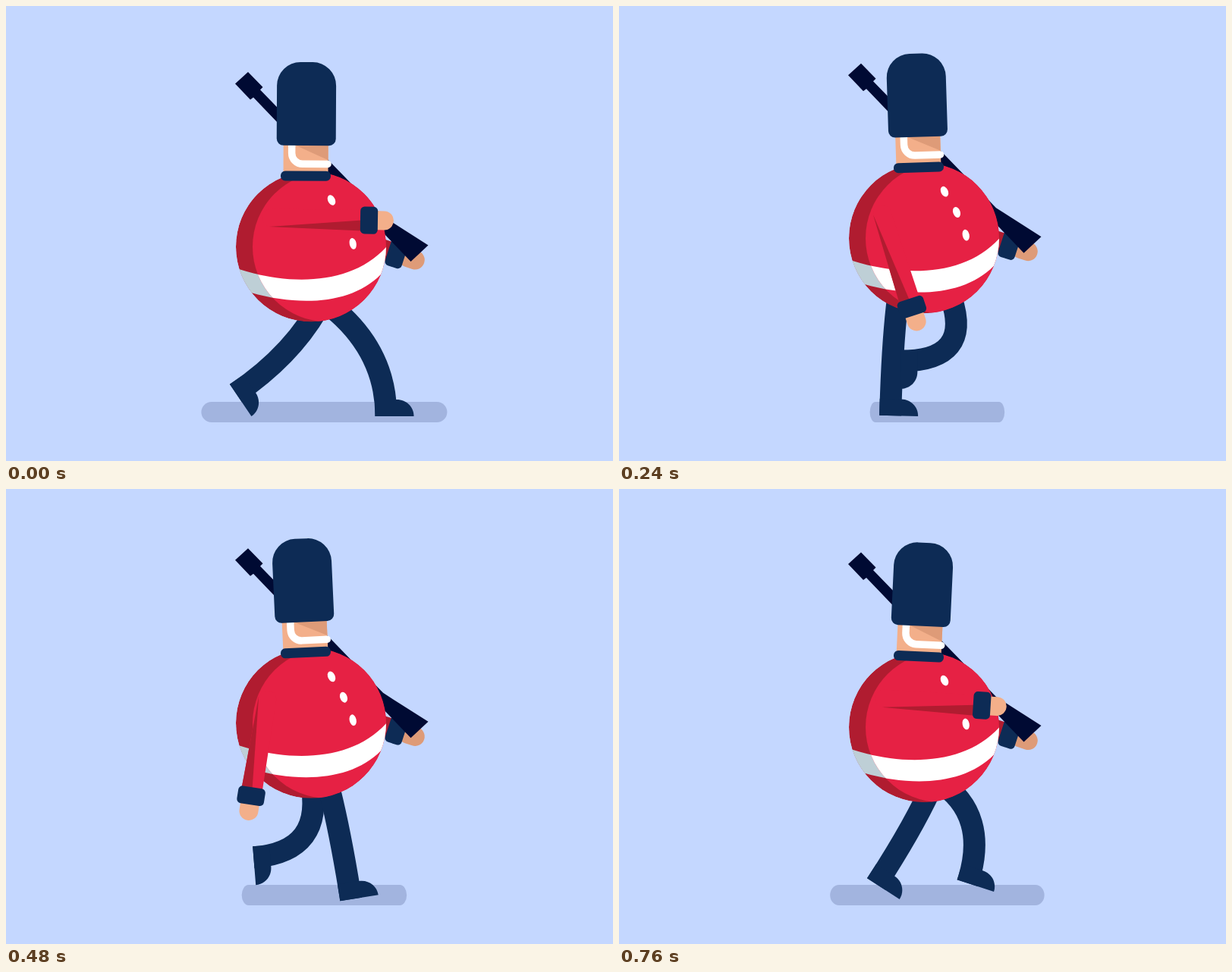
Recreate the animation shown at these times as an HTML page. Size 800 by 600 pixels, loop 800 ms.

```html
<!DOCTYPE html>
<html lang="en">
<head>
<meta charset="utf-8">
<title>Marching guard</title>
<style>
  html, body { margin: 0; width: 100%; height: 100%; overflow: hidden; background: #c4d7ff; }
  svg { display: block; width: 800px; height: 600px; }
  .navy { fill: #0d2b55; }
  .red { fill: #e62144; }
  .wine { fill: #b01c30; }
  .skin { fill: #f3af8a; }
  .tan { fill: #de9b78; }
  .white { fill: #fff; }
  .limb { fill: none; stroke: #0d2b55; stroke-width: 29; }
</style>
</head>
<body>
<svg viewBox="0 0 800 600">
  <defs>
    <clipPath id="belly"><circle cx="402" cy="317.5" r="99"/></clipPath>
    <clipPath id="lit"><circle cx="424" cy="317.5" r="99"/></clipPath>
    <path id="belt" d="M300 345L307 347C375 369 455 368 501 318L506 340L494 354C455 394 385 396 323 378L300 371Z"/>
    <path id="shoe" d="M-14.5 0H36.5C36.5-12 27-22 14-22H-14.5Z"/>
    <rect id="cuff" x="-18" y="123" width="36" height="23" rx="5.5"/>
  </defs>

  <rect id="shadow" x="-161.5" y="522" width="323" height="27" rx="13.5" fill="#a2b4df"/>

  <g class="bob">
    <g transform="translate(386.6 285.4) rotate(-72)">
      <rect class="wine" x="-13.5" y="60" width="27" height="66"/>
      <rect class="tan" x="-12.5" y="138" width="25" height="35" rx="12.5"/>
      <use href="#cuff" class="navy"/>
    </g>
    <path fill="#000a33" d="M302 102.5L319 87L338.5 107L335 110.5L497 277.5L556.5 315.5L533.5 337L326 120.5L322 123.5Z"/>
  </g>

  <g class="leg"><path class="limb"/><use href="#shoe" class="navy"/></g>
  <g class="leg"><path class="limb"/><use href="#shoe" class="navy"/></g>

  <g class="bob">
    <g clip-path="url(#belly)">
      <circle class="wine" cx="402" cy="317.5" r="99"/>
      <use href="#belt" fill="#becfd6"/>
      <g clip-path="url(#lit)">
        <rect class="red" x="300" y="215" width="205" height="205"/>
        <use href="#belt" class="white"/>
      </g>
    </g>
    <g class="white">
      <ellipse rx="4.7" ry="7.2" transform="translate(429 256) rotate(-25)"/>
      <ellipse rx="4.7" ry="7.2" transform="translate(445 283.3) rotate(-20)"/>
      <ellipse rx="4.5" ry="7.5" transform="translate(457.2 313.4) rotate(-12)"/>
    </g>

    <g id="head">
      <rect class="skin" x="365.5" y="180" width="59" height="42"/>
      <path class="tan" d="M380 183H424.5V203Z"/>
      <path d="M376.5 180V194A14.3 14.3 0 0 0 390.8 208.3H424" fill="none" stroke="#fff" stroke-width="9.5" stroke-linecap="round"/>
      <path class="navy" d="M356.5 105A31 31 0 0 1 387.5 74H403.5A31 31 0 0 1 434.5 105V175A9 9 0 0 1 425.5 184H365.5A9 9 0 0 1 356.5 175Z"/>
      <rect class="navy" x="362" y="217.7" width="66" height="13" rx="6"/>
    </g>

    <g id="arm">
      <path class="red" d="M-10.5 3Q-8-6 1-6Q12-6 13 5L13.5 125H-14Z"/>
      <path class="wine" d="M-10.5 3L-14 125H0Z"/>
      <rect class="skin" x="-12.5" y="134" width="25" height="33" rx="12.5"/>
      <use href="#cuff" class="navy"/>
    </g>
  </g>
</svg>

<script>
const LOOP = 800, STRIDE = LOOP / 2, STEP = 40;
const GROUND = 541, TOE = 36.5, SHIN = 95, HIP_Y = 385;
const { PI, sin, cos, max } = Math;
const $ = s => document.querySelector(s);
const $$ = s => [...document.querySelectorAll(s)];

const wave = t => cos(2 * PI * t / LOOP);
const mix = (a, b, u) => a + (b - a) * u;
const lag = u => u - 0.22 * sin(PI * u ** 1.6);
const lift = t => 12.5 * sin(PI * (t % STRIDE / STRIDE) ** 0.88);

// front/back: reach of the foot, toe: push-off angle, roll: how late the heel leaves,
// heel: landing tilt, tuck: extra tilt in the air, rise: foot clearance
const legs = [
  { start: 0, front: 501, back: 296, hip: 398, sway: 31, glide: u => u ** 0.7,
    toe: 88, roll: 8, heel: 0, tuck: 0, rise: 32 },
  { start: STRIDE, front: 481, back: 303, hip: 425, sway: 13, glide: lag,
    toe: 56, roll: 5, heel: 24, tuck: 52, rise: 38 }
];

function pose(leg, time) {
  const t = (time + leg.start) % LOOP, u = t % STRIDE / STRIDE;
  let x, turn, air = 0;
  if (t < STRIDE) {
    x = mix(leg.front, leg.back, leg.glide(u));
    turn = leg.toe * u ** leg.roll - leg.heel * sin(PI * u) * (1 - u) ** 2;
  } else {
    x = mix(leg.back, leg.front, lag(u));
    turn = leg.toe * (1 - u ** 2.2) + leg.tuck * sin(PI * u ** 1.4);
    air = leg.rise * sin(PI * u);
  }
  const a = turn * PI / 180;
  const y = GROUND - TOE * max(0, sin(a)) - air;
  return {
    x, y, turn,
    hip: leg.hip + leg.sway * wave(t - 665),
    kneeX: x + SHIN * sin(a),
    kneeY: y - SHIN * cos(a)
  };
}

const bobs = $$('.bob'), legEls = $$('.leg');
const head = $('#head'), arm = $('#arm'), shadow = $('#shadow');
const move = (el, value) => el.setAttribute('transform', value);

function draw(t) {
  const half = 154 - 66 * sin(PI * (t % STRIDE) / STRIDE) + 8 * wave(t);
  bobs.forEach(b => move(b, `translate(0 ${-lift(t)})`));
  move(head, `rotate(${2.7 - 0.48 * lift(t + STEP)} 395 224)`);
  move(arm, `translate(344 280.5) rotate(${-34.9 - 54.2 * wave(t)})`);
  move(shadow, `translate(419.4 0) scale(${half / 161.5} 1)`);
  legEls.forEach((el, i) => {
    const p = pose(legs[i], t);
    el.firstChild.setAttribute('d', `M${p.hip} ${HIP_Y}Q${p.kneeX} ${p.kneeY} ${p.x} ${p.y}`);
    move(el.lastChild, `translate(${p.x} ${p.y}) rotate(${p.turn})`);
  });
}

function tick() {
  draw(Math.floor(performance.now() % LOOP / STEP) * STEP);
  requestAnimationFrame(tick);
}
tick();
</script>
</body>
</html>
```
